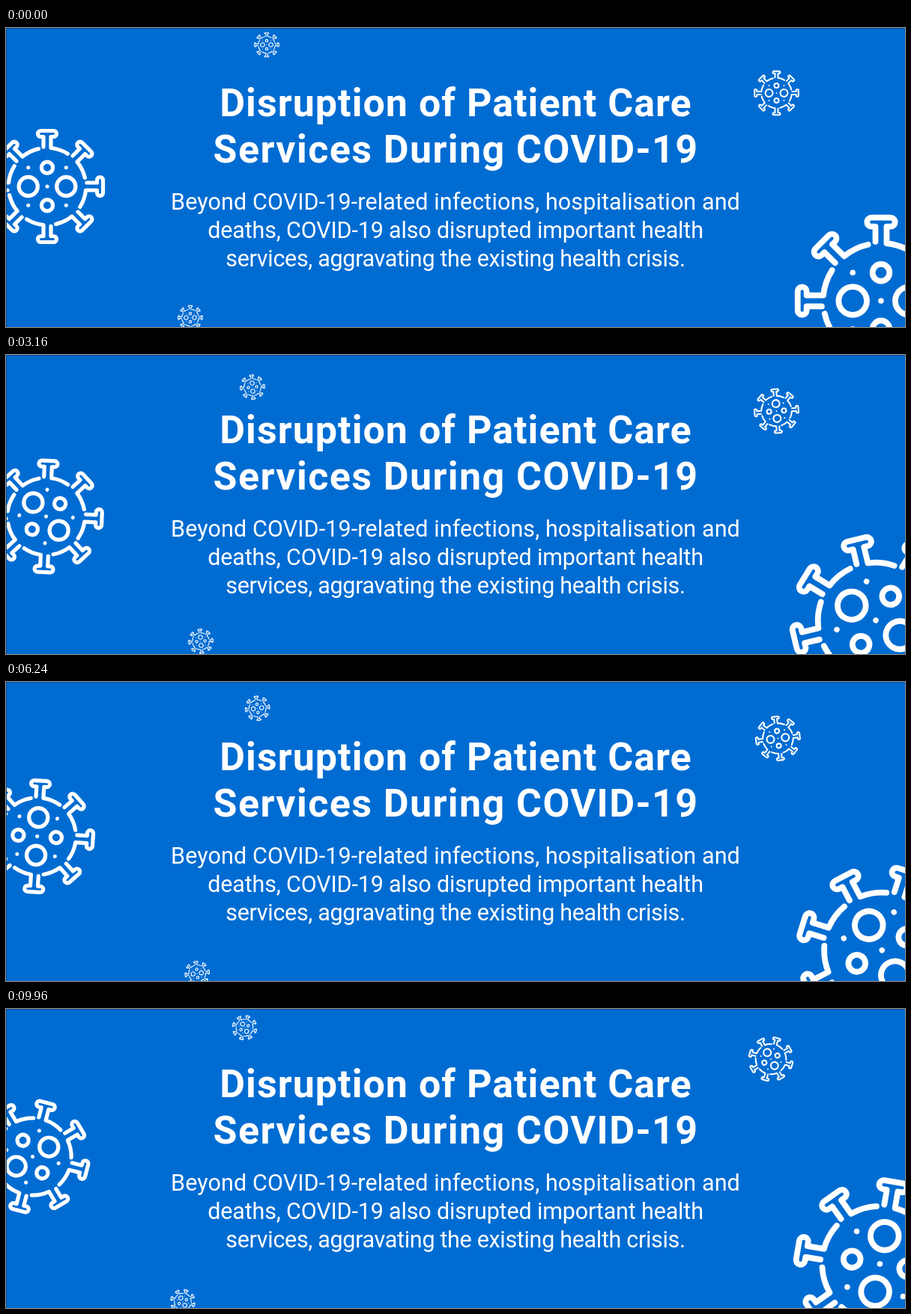
Animation of 1200 by 400 pixels, one loop 10000 ms. Source, as an HTML page:

```html
<!DOCTYPE html>
<html lang="en">
<head>
<meta charset="utf-8">
<title>Disruption of Patient Care</title>
<style>
  html, body { margin: 0; width: 100%; height: 100%; overflow: hidden; background: #006cd2; }
  svg { display: block; width: 100vw; height: 100vh; }
  text { font-family: Roboto, Arial, sans-serif; fill: #fff; text-anchor: middle; }
  .title { font-size: 52px; font-weight: 700; }
  .body { font-size: 30.5px; }
  .virus { fill: none; stroke: #fff; stroke-width: 5.2; stroke-linecap: round; stroke-linejoin: round; }
  .dot { fill: #fff; stroke: none; }
</style>
</head>
<body>
<svg viewBox="0 0 1200 400">
  <defs>
    <!-- One spike with the piece of shell that follows it clockwise -->
    <path id="spike" d="M27.4-43.8A51.7 51.7 0 0 0 5-51.5V-66.5H8.5a4 4 0 0 0 0-8H-8.5a4 4 0 0 0 0 8H-5V-53"/>
    <g id="virus" class="virus"></g>
  </defs>
  <rect width="1200" height="400" fill="#006cd2"/>
  <g id="stage"></g>
  <text class="title" x="600.5" y="118" letter-spacing="1">Disruption of Patient Care</text>
  <text class="title" x="600.5" y="180" letter-spacing="1.4">Services During COVID-19</text>
  <text class="body" x="600" y="243" letter-spacing=".1">Beyond COVID-19-related infections, hospitalisation and</text>
  <text class="body" x="600" y="281" letter-spacing="-.16">deaths, COVID-19 also disrupted important health</text>
  <text class="body" x="600" y="319" letter-spacing="-.32">services, aggravating the existing health crisis.</text>
  <path d="M0 .5H1200M.5 0V400" stroke="#0b4a8c" fill="none"/>
</svg>
<script>
const LOOP = 10000, STEP = 40, RADIUS = 77;
const times = [0, 1880, 3160, 5040, 7360, 9120, 9960];

// spin is in degrees per second; path holds a centre for each entry of times
const viruses = [
  { radius: 77, spin: 15, path: [[55, 212], [42, 217], [53.5, 216], [49.5, 217], [37.5, 198.5], [56, 212], [35.5, 197.5]] },
  { radius: 115, spin: 10, path: [[1168, 365], [1162, 356], [1161, 355], [1173, 364], [1164, 353], [1162, 353.5], [1166.5, 341]] },
  { radius: 30.3, spin: -30, path: [[1028.5, 87], [1018, 68], [1028.5, 75], [1036, 76], [1023.5, 74.5], [1018.5, 72], [1021, 67]] },
  { radius: 16.8, spin: -30, path: [[348, 22.5], [333, 41], [329, 43], [332.5, 39], [337.5, 32], [332, 30.5], [318.5, 25]] },
  { radius: 16.8, spin: -30, path: [[246, 387.5], [242.5, 389], [260, 383], [253, 394], [257, 384], [248.5, 380], [236, 391.5]] }
];

const svgNode = (name, attrs, parent) => {
  const node = document.createElementNS('http://www.w3.org/2000/svg', name);
  for (const key in attrs) node.setAttribute(key, attrs[key]);
  return parent.appendChild(node);
};

function buildVirus(parent) {
  for (let a = 0; a < 360; a += 45)
    svgNode('use', { href: '#spike', transform: `rotate(${a})` }, parent);
  const circle = (cx, cy, r, cls = '') => svgNode('circle', { cx, cy, r, class: cls }, parent);
  circle(0, 0, 2.5, 'dot');
  for (const s of [-1, 1]) {
    circle(25.3 * s, 0, 12.6);
    circle(0, 25.3 * s, 7.6);
    circle(25.3 * s, 25.3, 2.5, 'dot');
    circle(25.3 * s, -25.3, 2.5, 'dot');
  }
}

// Smooth curve through unevenly timed points
function along(path, t, axis) {
  const last = times.length - 1;
  let i = 0;
  while (i < last - 1 && t >= times[i + 1]) i++;
  const slope = k => {
    const a = Math.max(k - 1, 0), b = Math.min(k + 1, last);
    return (path[b][axis] - path[a][axis]) / (times[b] - times[a]);
  };
  const span = times[i + 1] - times[i], u = (t - times[i]) / span;
  const p = path[i][axis], q = path[i + 1][axis], v = 1 - u;
  return v * v * (1 + 2 * u) * p + u * u * (3 - 2 * u) * q
    + span * u * v * (v * slope(i) - u * slope(i + 1));
}

buildVirus(document.getElementById('virus'));
const stage = document.getElementById('stage');
for (const v of viruses) v.node = svgNode('use', { href: '#virus' }, stage);

function draw(elapsed) {
  const t = Math.floor((elapsed % LOOP) / STEP) * STEP;
  for (const { node, path, spin, radius } of viruses) {
    const x = along(path, t, 0), y = along(path, t, 1);
    node.setAttribute('transform',
      `translate(${x} ${y}) rotate(${spin * t / 1000}) scale(${radius / RADIUS})`);
  }
}

const start = performance.now();
function tick() {
  draw(performance.now() - start);
  requestAnimationFrame(tick);
}
tick();
</script>
</body>
</html>
```
